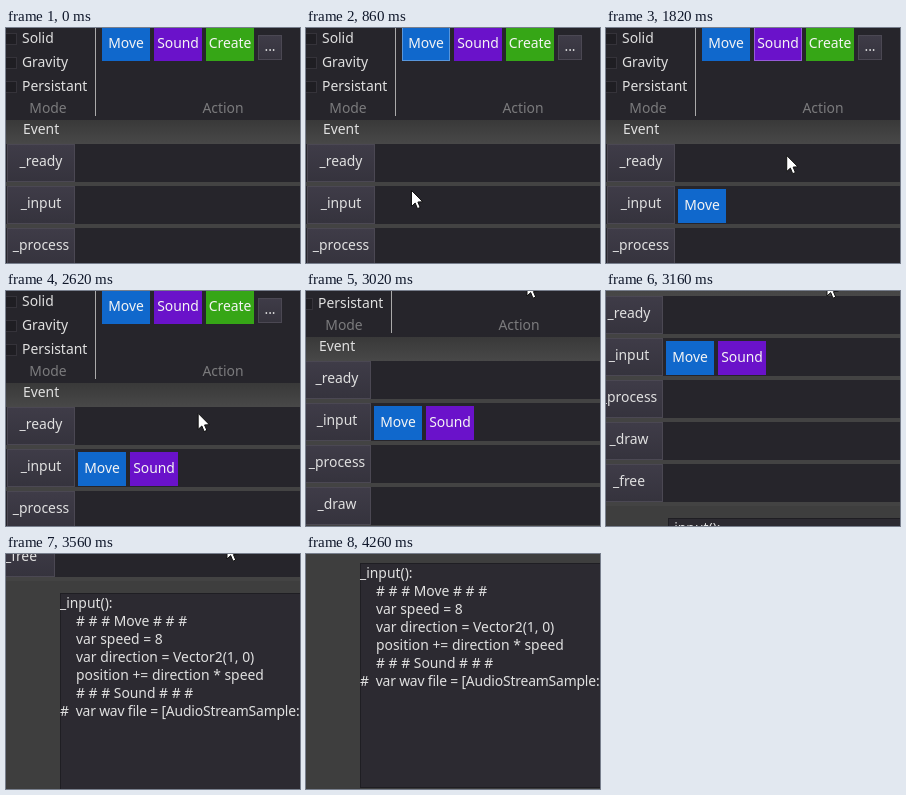
Recreate the animation shown at these times as an HTML page with a canvas. Size 294 px wide and 235 px high, loop 5060 ms.

```html
<!DOCTYPE html>
<html>
<head>
<meta charset="utf-8">
<style>
html, body { margin: 0; width: 100%; height: 100%; overflow: hidden; background: #3d3d3d; }
canvas { display: block; }
</style>
</head>
<body>
<canvas id="stage" width="294" height="235"></canvas>
<script>
const ctx = document.getElementById('stage').getContext('2d');
const W = 294, H = 235, LOOP = 5060;
const TEXT = '#e0e0e0', DARK = '#26252b', GRAY = '#3e3e3e';
const BLUE = '#1068cc', PURPLE = '#6a12ca', GREEN = '#36a616';
const MOVE_DROP = 1100, SOUND_DROP = 2140;
const arrow = new Path2D('M0 0V16L3.7 12.6 6 18.2 8.7 17 6.4 11.6 11.2 11.3Z');
const code = [
  '_input():', '# # # Move # # #', 'var speed = 8', 'var direction = Vector2(1, 0)',
  'position += direction * speed', '# # # Sound # # #', '#  var wav file = [AudioStreamSample:'
];
// Cursor trips, each easing from wherever the last one ended
const trips = [
  { from: 240, to: 540, x: 118, y: 15 },   // to the Move button
  { from: 560, to: 900, x: 105, y: 168 },  // drag it to _input
  { from: 1200, to: 1600, x: 180, y: 16 }, // to the Sound button
  { from: 1680, to: 1900, x: 181, y: 174 },
  { from: 2440, to: 2960, x: 221, y: -11 },
  { from: 4140, to: 4260, x: 300, y: 1 }
];

const progress = (t, from, to) => Math.min(1, Math.max(0, (t - from) / (to - from)));
const smooth = u => u * u * (3 - 2 * u);
const rise = (u, a, b) => 1 - (1 - u ** a) ** b;

function rect(x, y, w, h, fill, border) {
  ctx.fillStyle = fill;
  ctx.fillRect(x, y, w, h);
  if (border) {
    ctx.strokeStyle = border;
    ctx.lineWidth = 1;
    ctx.strokeRect(x + .5, y + .5, w - 1, h - 1);
  }
}

function text(s, x, y, color = TEXT, align = 'left') {
  ctx.fillStyle = color;
  ctx.textAlign = align;
  ctx.fillText(s, x, y);
}

function shade(y, h, top, bottom) {
  const g = ctx.createLinearGradient(0, y, 0, y + h);
  g.addColorStop(0, top);
  g.addColorStop(1, bottom);
  return g;
}

function button(s, x, y, w, h) {
  rect(x, y, w, h, shade(y, h, '#3f3c48', '#35333d'), '#4b4853');
  text(s, x + w / 2, y + h / 2 + 3, TEXT, 'center');
}

function action(name, x, y, color, hover) {
  rect(x, y, 48, 34, color, hover && 'rgba(255,255,255,.3)');
  text(name, x + 24, y + 21, '#f4f4f4', 'center');
}

function toolbar(t) {
  rect(0, -10, W + 30, 102, DARK);
  ['Solid', 'Gravity', 'Persistant'].forEach((s, i) => {
    rect(-1, 5 + i * 24, 12, 12, '#1f1e23', '#35333a');
    text(s, 16, 15 + i * 24);
  });
  text('Mode', 42, 85, '#7b7b7d', 'center');
  text('Action', 217, 85, '#7b7b7d', 'center');
  rect(89, -10, 1, 98, '#aaa');
  action('Move', 96, -1, BLUE, t > 520 && t < MOVE_DROP);
  action('Sound', 148, -1, PURPLE, t > 1560 && t < SOUND_DROP);
  action('Create', 200, -1, GREEN);
  button('...', 252, 7, 24, 25);
}

function events(t) {
  rect(0, 92, W + 30, 24, shade(92, 24, '#393939', '#484848'));
  text('Event', 17, 106);
  ['_ready', '_input', '_process', '_draw', '_free'].forEach((s, i) => {
    const y = 116 + i * 42;
    rect(0, y, W + 30, 38, DARK);
    rect(0, y + 38, W + 30, 4, '#434343');
    button(s, 1, y, 68, 38);
  });
  if (t >= MOVE_DROP) action('Move', 72, 161, BLUE);
  if (t >= SOUND_DROP) action('Sound', 124, 161, PURPLE);
}

function editor() {
  rect(74, 338, W, 225, '#2c2a31', '#1f1e23');
  code.forEach((s, i) => {
    const outdented = /^(_|#  )/.test(s);
    ctx.letterSpacing = s.length > 30 ? '-0.18px' : '0px';
    text(s, outdented ? 74 : 90, 353 + i * 18);
  });
  ctx.letterSpacing = '0px';
}

function cursor(t) {
  let x = 258, y = -20;
  for (const trip of trips) {
    const u = smooth(progress(t, trip.from, trip.to));
    x += (trip.x - x) * u;
    y += (trip.y - y) * u;
  }
  ctx.save();
  ctx.translate(x, y);
  ctx.fillStyle = '#fff';
  ctx.fill(arrow);
  ctx.strokeStyle = '#111';
  ctx.lineWidth = 1;
  ctx.stroke(arrow);
  ctx.restore();
}

function draw() {
  const t = performance.now() % LOOP;
  const pan = rise(progress(t, 2798, 3860), 2, 3.32);
  rect(0, 0, W, H, GRAY);
  ctx.font = '13.9px "Noto Sans", sans-serif';
  ctx.save();
  ctx.translate(-Math.round(20 * rise(pan, 1.5, 4)), -Math.round(329 * pan));
  toolbar(t);
  events(t);
  editor();
  ctx.restore();
  cursor(t);
  requestAnimationFrame(draw);
}
draw();
</script>
</body>
</html>
```
